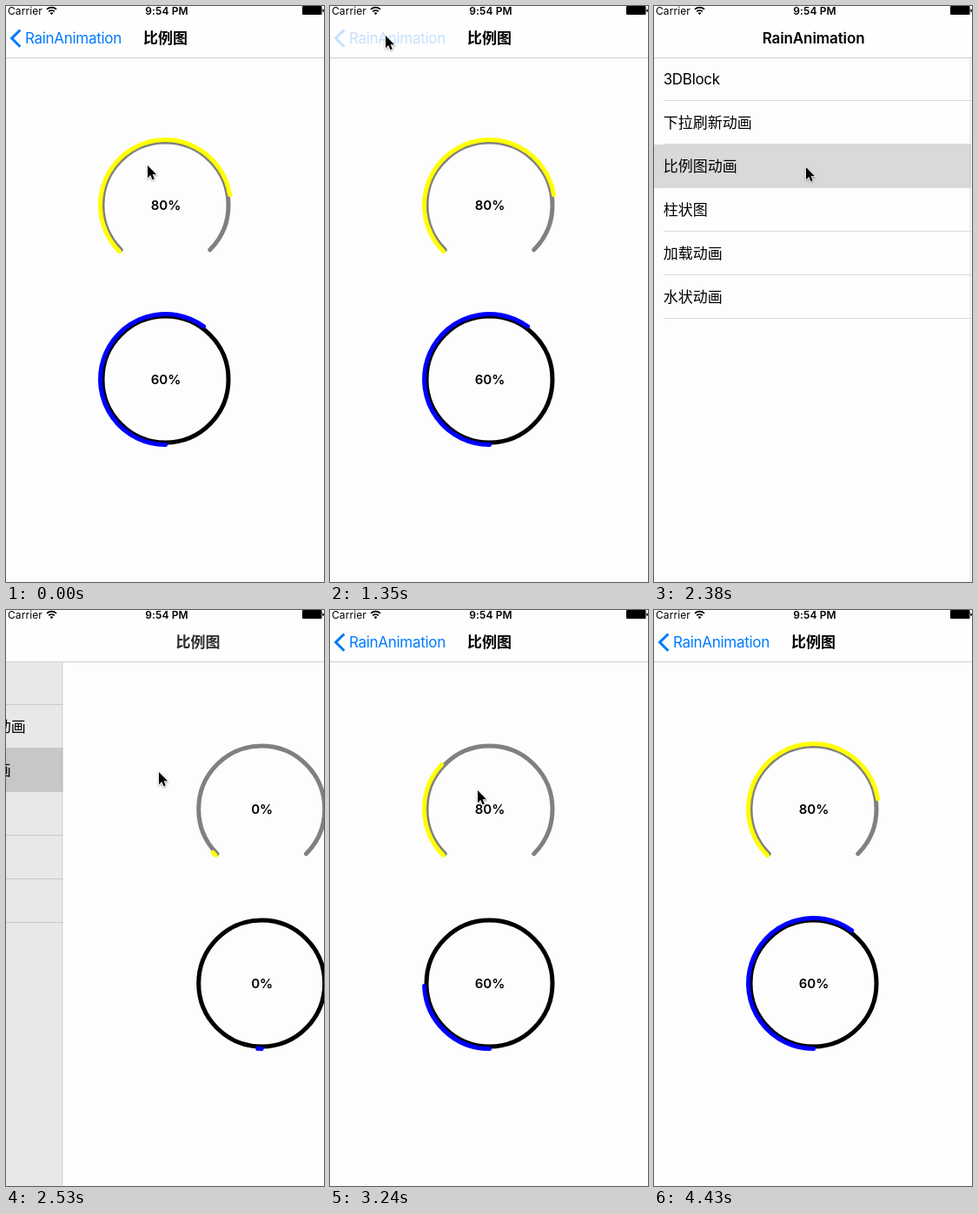
Recreate the animation shown at these times as an HTML page. Size 366 px wide and 661 px high, loop 4720 ms.

```html
<!DOCTYPE html>
<html lang="zh">
<head>
<meta charset="utf-8">
<title>比例图</title>
<style>
  html, body { margin: 0; width: 100%; height: 100%; overflow: hidden; background: #fdfdfd; }
  svg { display: block; width: 366px; height: 661px; }
  text { font: 17px Inter, "Noto Sans CJK SC", "Noto Sans CJK", sans-serif; white-space: pre; }
  .cjk { font-family: "Noto Sans CJK SC", "Noto Sans CJK", sans-serif; }
  .title { font-weight: 600; }
  .latin { letter-spacing: -.3px; }
  .percent { font-size: 15px; font-weight: 600; text-anchor: middle; }
  .status { font-size: 12px; }
  .ring { fill: none; stroke-width: 5; stroke-linecap: round; }
  #cursor { filter: drop-shadow(0 1px 1px rgba(0, 0, 0, .35)); }
</style>
</head>
<body>
<svg viewBox="0 0 366 661">
  <rect width="366" height="661" fill="#fdfdfd"/>

  <g id="list"></g>
  <rect id="dim" width="366" height="661"/>

  <g id="detail">
    <rect x="-1.5" width="1.5" height="661" fill="#000" opacity=".08"/>
    <rect width="368" height="661" fill="#fdfdfd"/>
  </g>
  <g id="rings">
    <path id="grayTrack" class="ring" stroke="#808080"/>
    <path id="yellow" class="ring" stroke="#ff0"/>
    <circle class="ring" cx="183.5" cy="428.5" r="72.5" stroke="#000"/>
    <path id="blue" class="ring" stroke="#00f"/>
    <text id="topPct" class="percent" x="184" y="234"></text>
    <text id="lowPct" class="percent" x="184" y="434"></text>
  </g>

  <rect width="366" height="59" fill="#fefefe"/>
  <rect y="59" width="366" height="1" fill="#d0d0d0"/>
  <text class="status" x="2" y="10" letter-spacing=".1">Carrier</text>
  <text class="status title" x="185" y="10" text-anchor="middle" letter-spacing=".1">9:54 PM</text>
  <g fill="none" stroke="#000" stroke-width="1.7">
    <path d="M47 3.9a8 8 0 0 1 11 0M49.2 6.3a4.9 4.9 0 0 1 6.6 0"/>
    <path d="M52.5 10.2l-1.9-2.1a2.8 2.8 0 0 1 3.8 0z" fill="#000" stroke="none"/>
  </g>
  <rect x="341" y="0" width="22.5" height="10" rx="1" />
  <path d="M364.3 3.3q1.7 .3 1.7 1.9t-1.7 1.9z"/>

  <path id="chevron" d="M16.4 27.5L6.6 37.1L16.4 46.7" fill="none" stroke="#007aff" stroke-width="3"/>
  <text id="back" class="latin" x="22" y="43" fill="#007aff">RainAnimation</text>
  <text id="listTitle" class="title" x="125" y="43" letter-spacing="-.1">RainAnimation</text>
  <text id="detailTitle" class="title cjk" x="158" y="43">比例图</text>

  <path id="cursor" d="M0 0V14.2L3.3 11.1L5.5 16.2L7.8 15.2L5.6 10.2H10.1Z"
        stroke="#fff" stroke-width="1.6" paint-order="stroke"/>
</svg>
<script>
const $ = id => document.getElementById(id);
const LOOP = 4720, WIDTH = 366, POP = 1437, PUSH = 2376;

// Screen refreshes: time, pointer x, pointer y
const STEPS = [
  [0, 163, 183], [150, 159, 183], [300, 62, 43], [450, 64, 34], [1350, 64, 34],
  [1490, 64, 34], [1640, 64, 34], [1780, 130, 130], [1930, 203, 243], [2080, 200, 241],
  [2230, 174, 184], [2380, 175, 185], [2530, 176, 186], [2680, 177, 187],
  [2830, 177, 190], [2950, 170, 207], [3090, 170, 207], [3240, 170, 207],
  [3390, 168, 212], [3540, 180, 240], [3690, 237, 383], [3830, 306, 614],
  [3980, -40, 0], [4130, -40, 0], [4280, -40, 0], [4430, -40, 0]
];

const rows = ["3DBlock", "下拉刷新动画", "比例图动画", "柱状图", "加载动画", "水状动画"];
$("list").innerHTML = '<rect y="159" width="366" height="50" fill="#d9d9d9"/>' +
  rows.map((name, i) =>
    `<rect x="11" y="${108 + 50 * i}" width="355" height="1" fill="#dcdcde"/>` +
    `<text class="${i ? "cjk" : "latin"}" x="11" y="${90 + 50 * i}">${name}</text>`).join("");

const clamp = (v, lo, hi) => Math.min(hi, Math.max(lo, v));
const move = (id, x, y = 0) => $(id).setAttribute("transform", `translate(${x} ${y})`);
const fade = (id, v) => $(id).setAttribute("opacity", clamp(v, 0, 1));

// Remaining distance of a critically damped spring
function spring(ms) {
  const x = Math.max(0, ms) * .0204;
  return (1 + x) * Math.exp(-x);
}

// cubic-bezier(.42, 0, .58, 1)
function easeInOut(x) {
  let lo = 0, hi = 1;
  for (let i = 0; i < 24; i++) {
    const u = (lo + hi) / 2, v = 1 - u;
    if (1.26 * u * v * v + 1.74 * u * u * v + u * u * u < x) lo = u; else hi = u;
  }
  return lo * lo * (3 - 2 * lo);
}

function arc(cy, r, from, sweep) {
  const point = deg => {
    const a = deg * Math.PI / 180;
    return `${183.5 + r * Math.cos(a)} ${cy + r * Math.sin(a)}`;
  };
  return `M${point(from)}A${r} ${r} 0 ${sweep > 180 ? 1 : 0} 1 ${point(from + sweep)}`;
}
$("grayTrack").setAttribute("d", arc(228.5, 72.5, 135, 270));

function draw(time) {
  const [t, cx, cy] = STEPS.findLast(s => s[0] <= time);
  const pushing = t >= PUSH;
  const away = pushing ? spring(t - PUSH) : 1 - spring(t - POP);
  const ringsAway = pushing ? spring(t - PUSH - 35) : away;
  const shown = 1 - away;

  move("list", -.3 * WIDTH * shown);
  fade("dim", .1 * shown);
  move("detail", WIDTH * away);
  move("rings", WIDTH * ringsAway);

  const backAlpha = pushing ? Math.exp(-35 * away)
    : t < 1350 ? 1 : .22 * (1 - away) + .06 * away * (1 - away ** 20);
  fade("back", backAlpha);
  fade("chevron", backAlpha);
  move("back", 103 * away);
  move("listTitle", -115 * shown);
  fade("listTitle", 1 - 11 * Math.max(0, shown - .01));
  move("detailTitle", 210 * away);
  fade("detailTitle", shown);

  const sweep = pushing ? 216 * easeInOut(clamp((t - 2350) / 2000, 0, 1)) : 216;
  $("yellow").setAttribute("d", arc(228.5, 75, 135, sweep));
  $("blue").setAttribute("d", arc(428.5, 75, 90, sweep));
  const count = pushing ? Math.max(0, Math.floor(13 + .12 * (t - 2680))) : 100;
  $("topPct").textContent = Math.min(80, count) + "%";
  $("lowPct").textContent = Math.min(60, count) + "%";

  move("cursor", cx, cy);
}

const start = performance.now();
function tick() {
  draw((performance.now() - start) % LOOP);
  requestAnimationFrame(tick);
}
tick();
</script>
</body>
</html>
```
